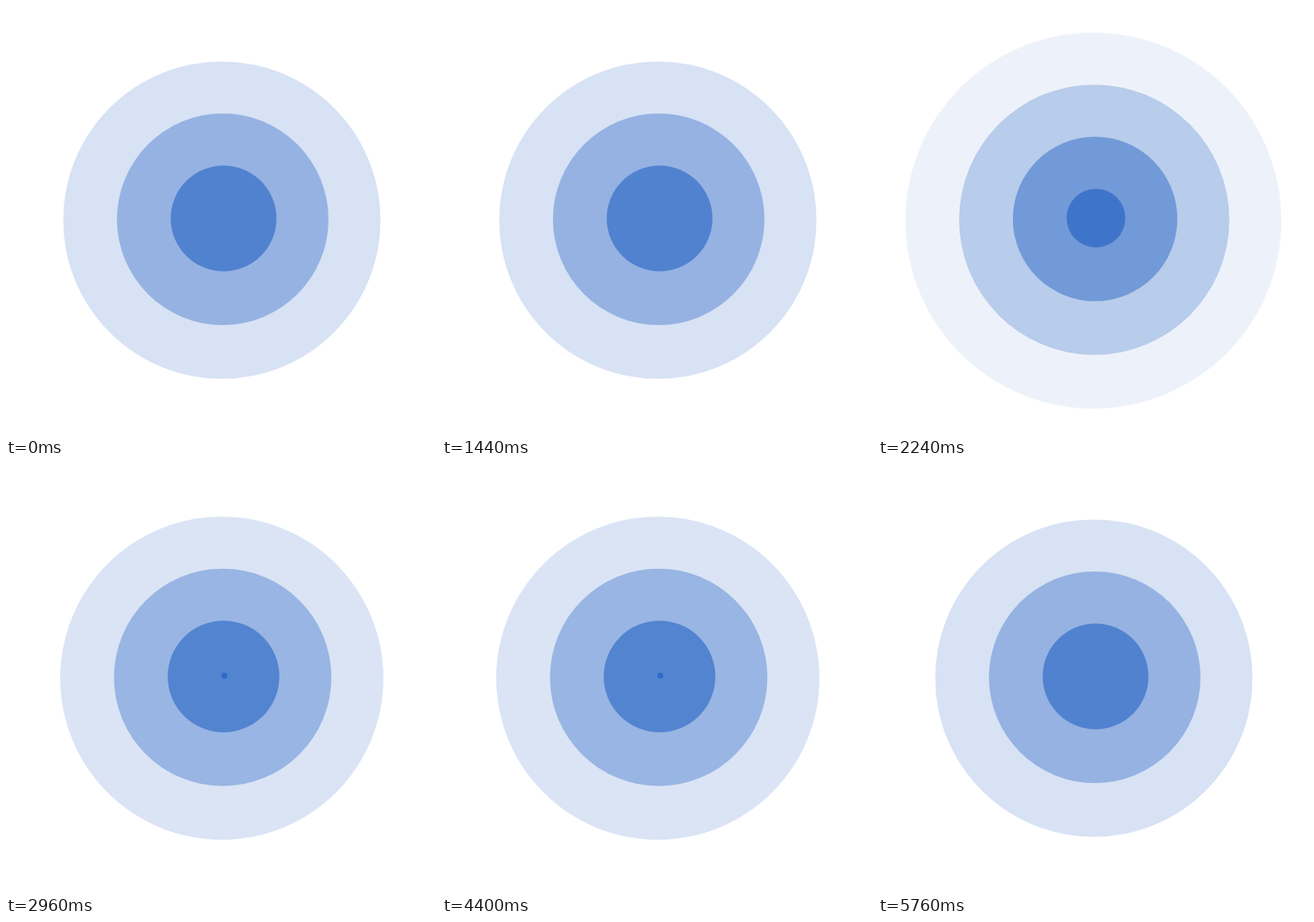
An HTML page with a canvas that plays this animation: 500 by 500 pixels, repeating every 5.8 s.

```html
<!DOCTYPE html>
<html lang="en">
<head>
<meta charset="utf-8">
<title>Ripple</title>
<style>
  html, body { margin: 0; width: 100%; height: 100%; overflow: hidden; background: #fff; }
  canvas { display: block; width: 500px; height: 500px; }
</style>
</head>
<body>
<canvas id="stage" width="500" height="500"></canvas>
<script>
const ctx = document.getElementById('stage').getContext('2d');
const LOOP = 5800;
const STEP = 40;
const LIFE = 144;      // steps from birth to full size
const COUNT = 4;       // discs alive at once
const MAX_R = 246;

// The centre drifts slightly as a disc grows and fades.
function drawDisc(p) {
  const alpha = Math.min(0.455, 0.62 * (1 - p));
  ctx.fillStyle = `rgba(0, 73, 184, ${alpha})`;
  ctx.beginPath();
  ctx.arc(254 - 4 * p, 246 + 4 * p, MAX_R * p, 0, Math.PI * 2);
  ctx.fill();
}

function render(ms) {
  const step = Math.floor((ms % LOOP) / STEP);
  ctx.fillStyle = '#fff';
  ctx.fillRect(0, 0, 500, 500);
  for (let i = 0; i < COUNT; i++) {
    drawDisc(((step + i * LIFE / COUNT) % LIFE) / LIFE);
  }
}

const start = performance.now();
function tick() {
  render(performance.now() - start);
  requestAnimationFrame(tick);
}
tick();
</script>
</body>
</html>
```
